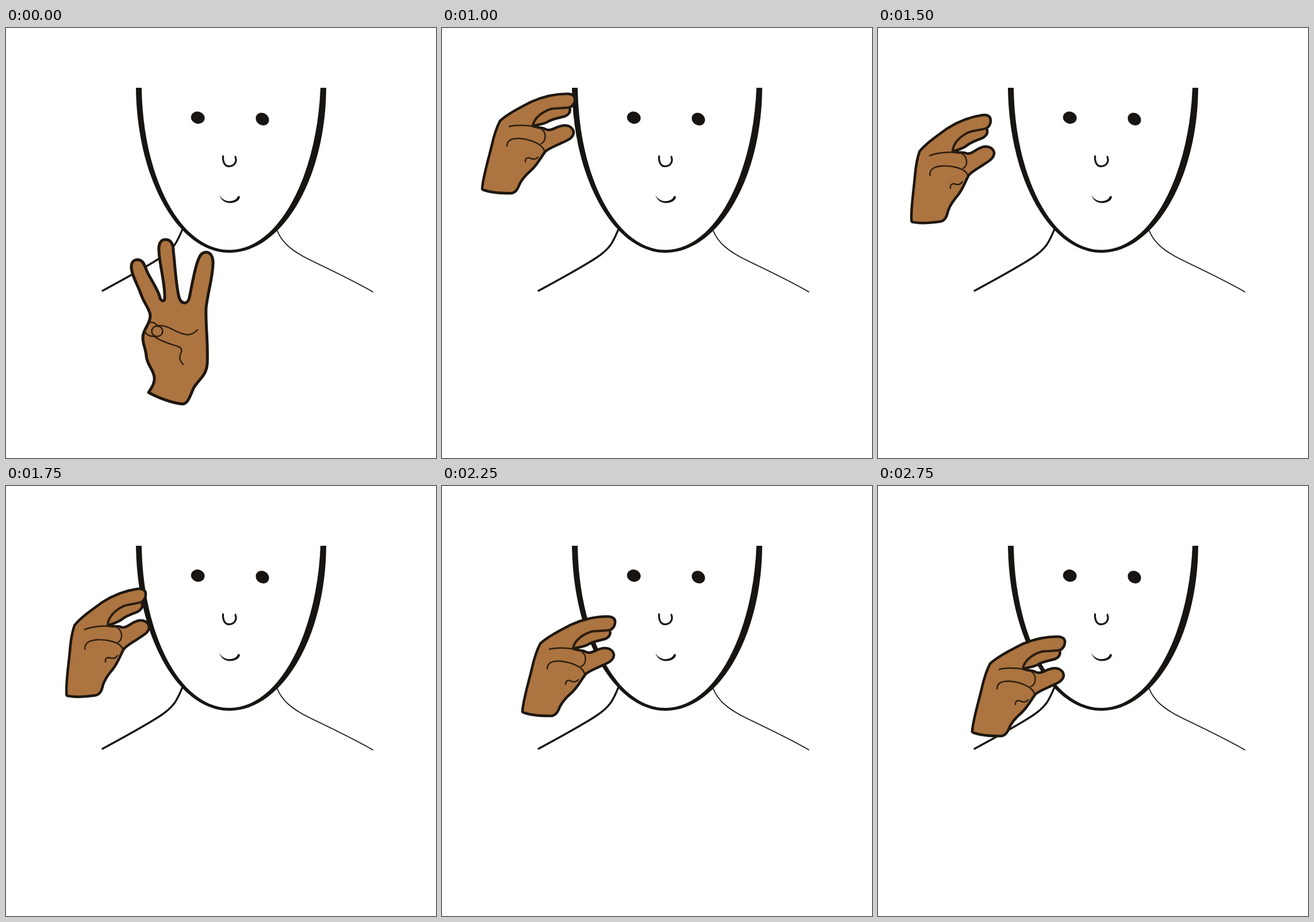
Recreate the animation shown at these times as an HTML page. Size 748 by 748 pixels, loop 3000 ms.

```html
<!DOCTYPE html>
<html lang="en">
<head>
<meta charset="utf-8">
<title>Hand sign</title>
<style>
  html, body { margin: 0; width: 100%; height: 100%; overflow: hidden; background: #fff; }
  svg { display: block; width: 100%; height: 100%; }
  .ink { fill: #171411; }
  .line { fill: none; stroke: #171411; stroke-linecap: round; stroke-linejoin: round; }
  .skin { fill: #ac7440; stroke: #1e1710; stroke-linejoin: round; }
  .crease { fill: none; stroke: #2b1d10; stroke-width: 2.4; stroke-linecap: round; }
</style>
</head>
<body>
<svg viewBox="0 0 748 748">
  <g id="person">
    <path class="ink" d="M226 104 C228 266 301 391 389 391 C478 391 556 266 557 104 H547
      C541 258 474 386 389 386 C303 386 238 259 236 104Z"/>
    <ellipse class="ink" cx="333.7" cy="156" rx="12" ry="10.5" transform="rotate(15 333.7 156)"/>
    <ellipse class="ink" cx="446" cy="158.5" rx="12" ry="10.5" transform="rotate(35 446 158.5)"/>
    <path class="line" stroke-width="3.2" d="M377.500 223 C377 234 381 241 389 240.500 C398 240 402 232 399 224"/>
    <path class="ink" d="M371 290 C375 298 383 302 391 301 C398 300 402 297 403 293 Q406 291 407 294
      C406 300 399 304.500 389 304.500 C380 304 374 299 371 290Z"/>
    <path class="line" stroke-width="3.4" d="M307 350 C298 371 294 383 268 400 C240 418 205 437 168 457"/>
    <path class="line" stroke-width="1.8" d="M472 353 C480 373 497 387 522 400 C560 419 600 437 638 459"/>
  </g>

  <g id="openHand">
    <path class="skin" stroke-width="5" d="M248 634 C254 625 259 617 258 608 C257 594 245 586 244 570
      C243 556 238 552 238 538 C238 524 251 516 251 500 C250 489 240 478 235 464
      C230 448 218 430 218 415 C218 407 223 403 229 403 C240 404 241 414 246 425
      C254 441 263 453 267 466 C269 477 277 477 276 469 C277 445 267 412 266 388
      C265 376 269 368 277 368 C287 368 291 376 291 387 C294 412 295 440 300 464
      C303 482 316 482 319 469 C323 450 326 430 332 410 C336 398 339 390 348 390
      C357 390 361 400 360 412 C359 436 351 460 348 487 C347 520 352 550 350 585
      C348 606 334 612 326 627 C320 641 316 655 306 654 C288 652 264 643 248 634Z"/>
    <ellipse class="crease" cx="263" cy="527.500" rx="9.500" ry="9"/>
    <path class="crease" d="M247 513 C256 510 260 514 264 518 C283 515 297 533 316 533.500 Q326 533 333 525"/>
    <path class="crease" d="M241 528 C246 535 251 537 257 536 C270 546 288 550 302 555
      C313 564 293 569 308 585"/>
  </g>

  <g id="pinchHand">
    <path class="skin" stroke-width="4.500" d="M101 276 C102 258 112 225 117 204 C121 186 125 172 132 159
      C145 147 165 137 186 126 C206 117 230 112 249 112 C259 112 263 117 262 123
      C262 129 257 134 253 136 C255 143 252 148 245 151 C235 154 225 155 216 160
      C209 165 199 165 189 168 C199 172 207 170 212 174 C222 178 231 167 244 167
      C254 167 260 173 260 180 C259 189 249 193 240 197 C230 202 218 206 211 212
      C203 222 198 234 186 245 C178 252 170 261 166 269 C163 277 159 285 150 285
      C138 285 118 284 106 280 Q100 279 101 276Z"/>
    <path class="crease" style="stroke-width:4" d="M189 167 C192 152 208 142 222 138 C232 136 244 138 254 135"/>
    <path class="crease" d="M148 169 C162 165 180 167 194 169 C206 171 211 179 210.500 187 Q210 196 203 199"/>
    <path class="crease" d="M144 203 C144 192 154 189 166 189.500 C183 191 207 199 209 212"/>
    <path class="crease" d="M176 230 C176 222 182 222 187 225 Q194 227 198 222"/>
  </g>
</svg>
<script>
  const LOOP = 3000, STEP = 250, OPEN_TIME = 750;
  const TILT = "rotate(-8.2 100 277)";
  // Offset of the pinched hand at each step, and whether it is tilted.
  const poses = [
    [0, 0], [-31, 2.5], [-33, 37.5, true], [-42.5, 59, true], [4.5, 86.5, true],
    [24, 101], [39, 115], [54.5, 136], [63, 150]
  ];
  const openHand = document.getElementById("openHand");
  const pinchHand = document.getElementById("pinchHand");
  const show = (part, visible) => part.setAttribute("visibility", visible ? "visible" : "hidden");

  function draw(now) {
    const time = now % LOOP;
    const isOpen = time < OPEN_TIME;
    show(openHand, isOpen);
    show(pinchHand, !isOpen);
    if (!isOpen) {
      const [x, y, tilted] = poses[Math.floor((time - OPEN_TIME) / STEP)];
      pinchHand.setAttribute("transform", `translate(${x} ${y}) ${tilted ? TILT : ""}`);
    }
  }

  const start = performance.now();
  function tick() {
    draw(performance.now() - start);
    requestAnimationFrame(tick);
  }
  tick();
</script>
</body>
</html>
```
